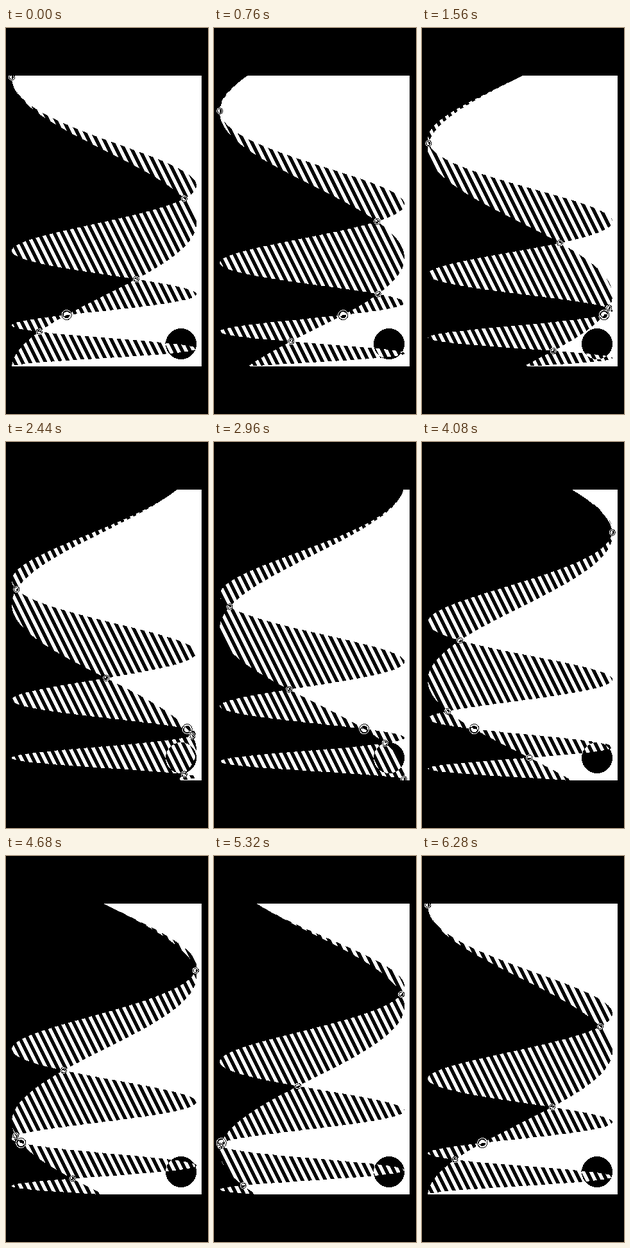
Recreate the animation shown at these times as an HTML page with a canvas. Size 315x600 px, loop 6.32 s.

```html
<!DOCTYPE html>
<html lang="en">
<head>
<meta charset="utf-8">
<title>Two waves</title>
<style>
  html, body { margin: 0; width: 100%; height: 100%; overflow: hidden; background: #000; }
  canvas { display: block; }
</style>
</head>
<body>
<canvas id="stage" width="315" height="600"></canvas>
<script>
const TAU = 2 * Math.PI;
const STEP = 40, LOOP = 6320;
const LEFT = 1, RIGHT = 305, TOP = 74, BOTTOM = 526;
const MID_X = 153, MID_Y = 300, AMP = 144;
const SPAN = AMP * Math.PI;
const PITCH = 12, SLANT = 0.5;

const ctx = document.getElementById('stage').getContext('2d');
const W = RIGHT - LEFT, H = BOTTOM - TOP;
const image = ctx.createImageData(W, H);
const pixels = new Uint32Array(image.data.buffer);
const BLACK = 0xff000000, WHITE = 0xffffffff, FLIP = 0x00ffffff;

// u runs from 0 at the top to 1 at the bottom
const toU = y => (y - MID_Y) / SPAN + 0.5;
const toY = u => MID_Y + (u - 0.5) * SPAN;
const evenPhase = u => TAU * u;
const chirpPhase = u => 3 * TAU * u / (3 - 2 * u);
const waveX = phase => MID_X - AMP * Math.cos(phase);
const FIXED_U = (Math.sqrt(7) - 1) / 2;

function stripe(x, y) {
  const p = (x - MID_X - (y - MID_Y) * SLANT) / PITCH;
  return p - Math.floor(p) < 0.5 ? WHITE : BLACK;
}

function fillWaves(t) {
  for (let row = 0; row < H; row++) {
    const y = TOP + row + 0.5, u = toU(y);
    const a = waveX(evenPhase(u) - t);
    const b = waveX(chirpPhase(u) - t);
    const near = Math.min(a, b), far = Math.max(a, b);
    const flip = a < b ? FLIP : 0; // stripes swap colour where the waves swap sides
    for (let col = 0; col < W; col++) {
      const x = LEFT + col + 0.5;
      pixels[row * W + col] =
        x < near ? BLACK : x > far ? WHITE : stripe(x, y) ^ flip;
    }
  }
}

function invertDisc(cx, cy, r) {
  const x0 = cx - LEFT - 0.5, y0 = cy - TOP - 0.5;
  for (let row = Math.max(0, Math.ceil(y0 - r)); row <= Math.min(H - 1, y0 + r); row++) {
    const half = Math.sqrt(r * r - (row - y0) ** 2);
    for (let col = Math.max(0, Math.ceil(x0 - half)); col <= Math.min(W - 1, x0 + half); col++) {
      pixels[row * W + col] ^= FLIP;
    }
  }
}

function markWave(u, t, radii) {
  const x = waveX(evenPhase(u) - t), y = toY(u);
  for (const r of radii) invertDisc(x, y, r);
}

// Solves evenPhase(u) + chirpPhase(u) = sum
function crossing(sum) {
  const s = sum / TAU;
  const b = 6 + 2 * s;
  return (b - Math.sqrt(b * b - 24 * s)) / 4;
}

function draw(ms) {
  const t = (Math.floor((ms % LOOP) / STEP) + 1) * STEP / 1000;
  fillWaves(t);
  invertDisc(273, 491, 24);
  for (let n = -2; n <= 4; n++) {
    const sum = 2 * t + n * TAU;
    if (sum >= 0 && sum <= 4 * TAU) markWave(crossing(sum), t, [5, 4, 3]);
  }
  markWave(FIXED_U, t, [8, 7, 5]);
  ctx.putImageData(image, LEFT, TOP);
}

ctx.fillRect(0, 0, 315, 600);
const start = performance.now();
function tick() {
  draw(performance.now() - start);
  requestAnimationFrame(tick);
}
tick();
</script>
</body>
</html>
```
